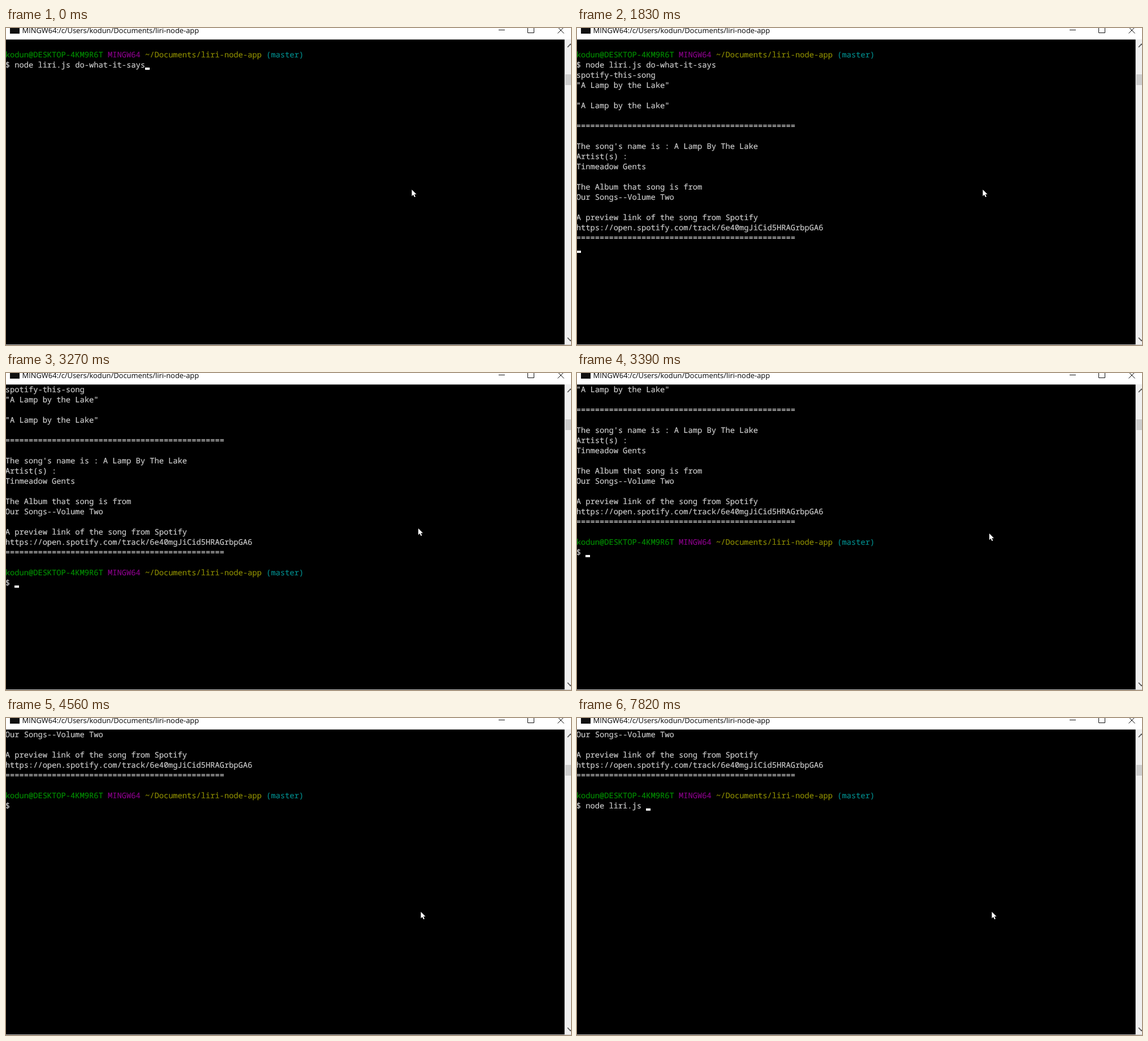
Recreate the animation shown at these times as an HTML page. Size 999 px wide and 561 px high, loop 8 s.

```html
<!DOCTYPE html>
<html lang="en">
<head>
<meta charset="utf-8">
<title>Terminal</title>
<style>
  html, body { margin: 0; width: 100%; height: 100%; overflow: hidden; background: #fff; }
  svg { display: block; }
  text { white-space: pre; text-rendering: geometricPrecision; }
  .title { font: 12.9px "Open Sans", "Noto Sans", sans-serif; fill: #000; }
  #lines {
    font: 13.745px "Noto Sans Mono", "DejaVu Sans Mono", monospace;
    color: #ccc; fill: currentColor; stroke: currentColor; stroke-width: .2;
  }
  #lines tspan { fill: currentColor; stroke: currentColor; }
  .user { color: #008c00; }
  .system { color: #880088; }
  .path { color: #8a8a00; }
  .branch { color: #008a8a; }
  .icon { fill: none; stroke: #111; }
  .chevron { fill: none; stroke: #505050; stroke-width: 1.6; }
</style>
</head>
<body>
<svg width="999" height="561" viewBox="0 0 999 561">
  <rect width="999" height="561" fill="#fff"/>
  <rect x="7" y="-7" width="17" height="17" fill="#111"/>
  <text class="title" x="28.5" y="9">MINGW64:/c/Users/kodun/Documents/liri-node-app</text>
  <path class="icon" d="M871 3.5h11M922.5 -2.5h11v11h-11zM975.5 -1.5l11 11M986.5 -1.5l-11 11"/>

  <rect x="987.5" y="20" width="11.5" height="540" fill="#f0f0f0"/>
  <rect y="20.4" width="987.6" height="539.6" fill="#000"/>
  <svg y="20" width="988" height="540">
    <g id="lines"></g>
    <rect id="caret" width="8" height="4" fill="#fff"/>
  </svg>

  <rect id="thumb" x="989" width="10" height="19" fill="#cdcdcd"/>
  <path class="chevron" d="M993 34l5 -5.5l5 5.5M993 548l5 5.5l5 -5.5"/>
  <rect y="560" width="999" height="1" fill="#c8c8c8"/>
  <path id="mouse" d="M0 0v11.5l2.6 -2.5l2 4.3l1.9 -.9l-2 -4.1h3.7z" fill="#fff"/>
</svg>

<script>
const LOOP = 8000, ROW = 18, CHAR = 8.247, LEFT = -1.3;
const BLINK = 522, FIRST_BLINK = 376;
const $ = id => document.getElementById(id);

const prompt = [
  ['user', 'kodun@DESKTOP-4KM9R6T'], ['system', ' MINGW64'],
  ['path', ' ~/Documents/liri-node-app'], ['branch', ' (master)']
].map(([name, text]) => `<tspan class="${name}">${text}</tspan>`).join('');
const command = '$ node liri.js do-what-it-says';
const rule = '='.repeat(47);

const rows = [
  '', prompt, command,
  'spotify-this-song', '"A Lamp by the Lake"', '', '"A Lamp by the Lake"', '',
  rule, '',
  "The song's name is : A Lamp By The Lake", 'Artist(s) :', 'Tinmeadow Gents', '',
  'The Album that song is from', 'Our Songs--Volume Two', '',
  'A preview link of the song from Spotify',
  'https://open.spotify.com/track/6e40mgJiCid5HRAGrbpGA6',
  rule, '', prompt, '$ '
];
const LAST = rows.length - 1;

$('lines').innerHTML = rows.map((text, i) =>
  `<text x="${LEFT}" y="${i * ROW + 14}">${text}</text>`).join('');
const lines = [...$('lines').children];

// A burst is a run of evenly spaced key presses or wheel notches.
const burst = (start, gap = 1, count = 1) => ({ start, gap, count });
const steps = ({ start, gap, count }, t) =>
  Math.max(0, Math.min(count, Math.floor((t - start) / gap) + 1));
const latest = (b, t) => steps(b, t) && b.start + (steps(b, t) - 1) * b.gap;

const recall = burst(5760), tap = burst(6410), hold = burst(6910, 130, 5), taps = burst(7680, 140, 2);
const wheel = [burst(3270, 120, 2), burst(3940, 120, 3)];

// Key points: time, then the row the output has reached or the pointer position.
const output = [[0, 2], [800, 3], [1420, 6], [1830, 20], [1980, LAST]];
const path = [[0, 717.5, 286], [3150, 729, 275], [3390, 729, 284],
  [3790, 743, 350], [3940, 735.5, 343], [4310, 733.5, 343]];

const at = (track, t) => track.findLast(point => point[0] <= t);
const move = (id, x, y) => $(id).setAttribute('transform', `translate(${x} ${y})`);

function typedLength(t) {
  if (!steps(recall, t)) return 2;
  return command.length - steps(tap, t) - Math.ceil(2.4 * steps(hold, t)) - steps(taps, t);
}

// The caret blinks on a fixed beat and shows again whenever it moves.
function caretOn(t) {
  const moved = Math.max(at(output, t)[0], ...[recall, tap, hold, taps].map(b => latest(b, t)));
  const beat = time => Math.floor((time - FIRST_BLINK) / BLINK);
  return (beat(t) - beat(moved)) % 2 === 0;
}

function draw(t) {
  const row = at(output, t)[1], length = typedLength(t);
  const top = 3 * wheel.reduce((sum, b) => sum + steps(b, t), 0);
  const column = row === 2 ? command.length : row === LAST ? length : 0;

  lines.forEach((line, i) => {
    const visible = i < row || (i === row && rows[i].startsWith('$'));
    line.style.display = visible ? '' : 'none';
  });
  lines[LAST].textContent = command.slice(0, length);
  move('lines', 0, -top * ROW);
  move('caret', Math.round(LEFT + column * CHAR), (row - top) * ROW + 14);
  $('caret').style.display = caretOn(t) ? '' : 'none';
  move('mouse', ...at(path, t).slice(1));
  move('thumb', 0, 82 + Math.round(top / 15));
}

const start = performance.now();
function tick() {
  draw((performance.now() - start) % LOOP);
  requestAnimationFrame(tick);
}
tick();
</script>
</body>
</html>
```
